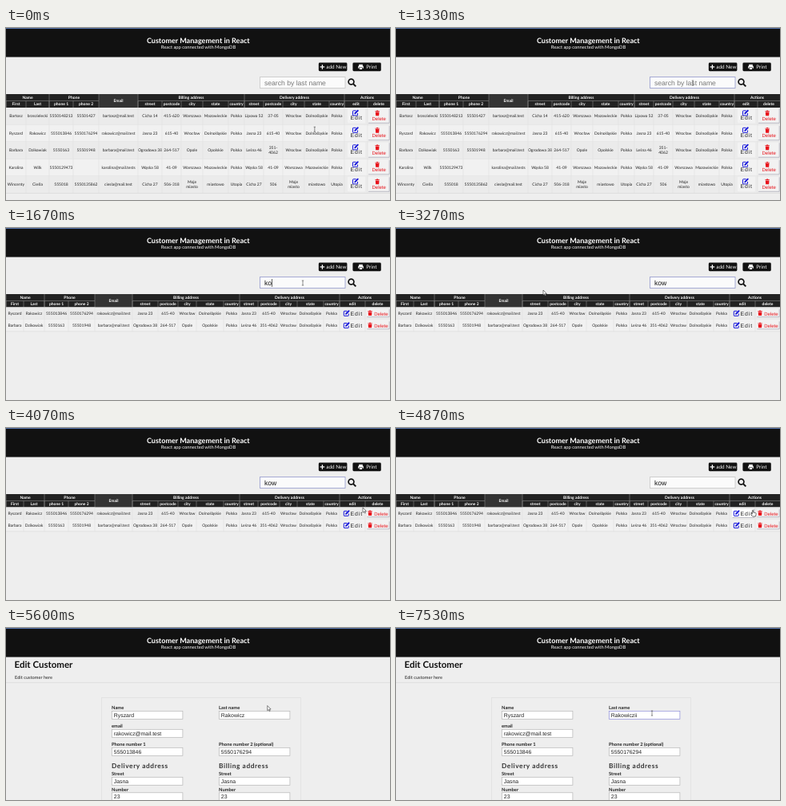
An HTML page for the animation above (8 s loop, 480 px wide and 216 px high).

```html
<!DOCTYPE html>
<html lang="en">
<head>
<meta charset="utf-8">
<title>Customer Management</title>
<style>
  html, body { margin: 0; width: 100%; height: 100%; overflow: hidden; background: #eee; }
  svg { display: block; width: 480px; height: 216px; }
  text { font-family: Lato, "Open Sans", sans-serif; text-rendering: geometricPrecision; white-space: pre; }
  .b { font-weight: 700; }
  .field { font-family: "Liberation Sans", Arial, sans-serif; }
</style>
</head>
<body>
<svg viewBox="0 0 480 216">
  <defs>
    <g id="pen">
      <path d="M4.6 1.4H1.2Q.5 1.4 .5 2.1V6.9Q.5 7.5 1.2 7.5H5.9Q6.5 7.5 6.5 6.9V4.6" fill="none" stroke="#1818dc"/>
      <path d="M2.3 5.8L2.6 4.1L6.1 .5Q6.8 0 7.4 .6Q8 1.2 7.5 1.9L4 5.5Z" fill="#1818dc"/>
    </g>
    <path id="bin" fill="#e8141c" d="M0 .8H1.6L2 .1H3.5L3.9 .8H5.5V1.5H0ZM.4 2H5.1L4.8 6.2Q4.7 6.7 4.2 6.7H1.3Q.8 6.7 .7 6.2Z"/>
    <path id="arrow" d="M0 0V6.2L1.5 4.9L2.5 7L3.4 6.6L2.5 4.5H4.4Z" fill="#fff" stroke="#333" stroke-width=".6"/>
    <path id="beam" d="M-1.2 -3H1.2M0 -3V3M-1.2 3H1.2" fill="none" stroke="#444" stroke-width=".6"/>
    <path id="hand" d="M-.6 .3Q0 -.4 .6 .3V3L3.5 3.6Q4.3 3.9 4.1 4.8L3.5 8H-.5L-2.4 5.2Q-2.3 4.3 -1.4 4.6L-.6 5.2Z" fill="#fff" stroke="#222" stroke-width=".6"/>
  </defs>
  <rect width="480" height="216" fill="#eee"/>
  <g id="view"></g>
  <rect width="480" height="36.5" fill="#111"/>
  <rect width="480" height="1" fill="#5574ae"/>
  <g fill="#fff" text-anchor="middle">
    <text class="b" x="240.3" y="19" font-size="9.05">Customer Management in React</text>
    <text x="240.5" y="26.3" font-size="5.8">React app connected with MongoDB</text>
  </g>
  <use id="cursor"/>
</svg>
<script>
const LOOP = 8000, FPS = 15;
const view = document.getElementById('view');
const cursor = document.getElementById('cursor');
const ruler = document.createElement('canvas').getContext('2d');

const customers = [
  'Bartosz|brzezielecki|5550148213|55501427|bartosz@mail.test|Cicha 14|415-620|Warszawa|Mazowieckie|Polska|Lipowa 52|37-05|Wrocław|Dolnośląskie|Polska',
  'Ryszard|Rakowicz|555013846|5550176294|rakowicz@mail.test|Jasna 23|615-40|Wrocław|Dolnośląskie|Polska|Jasna 23|615-40|Wrocław|Dolnośląskie|Polska',
  'Barbara|Dzikowiak|5550163|55501948|barbara@mail.test|Ogrodowa 38|264-517|Opole|Opolskie|Polska|Leśna 46|351-~4062|Wrocław|Dolnośląskie|Polska',
  'Karolina|Wilk|5550129473||karolina@mail.tests|Wąska 58|41-09|Warszawa|Mazowieckie|Polska|Wąska 58|41-09|Warszawa|Mazowieckie|Polska',
  'Wincenty|Cieśla|555018|5550135862|ciesla@mail.test|Cicha 27|506-318|Moje~miasto|miastowo|Utopia|Cicha 27|506|Moje~miasto|miastowo|Utopia'
].map(row => row.split('|'));

const address = ['street', 'postcode', 'city', 'state', 'country'];
const columns = ['First', 'Last', 'phone 1', 'phone 2', '', ...address, ...address, 'edit', 'delete'];
const groups = [['Name', 0, 2], ['Phone', 2, 4], ['Billing address', 5, 10], ['Delivery address', 10, 15], ['Actions', 15, 17]];
const tall = { top: 100, row: 21.5, x: [0, 25, 54, 84, 116, 165, 195, 219, 246, 278, 298, 322, 346, 373, 404, 423, 452, 480] };
const flat = { top: 99.5, row: 15.2, x: [0, 22, 48, 78, 111, 158, 190, 215, 238, 272, 292, 315, 342, 364, 397, 417, 449, 480] };

// Step tables: [time, value] holds until the next entry.
const query = [[0, ''], [1470, 'k'], [1600, 'ko'], [2330, 'kow']];
const surname = [[0, 'Rakowicz'], [6870, 'Rakowiczi'], [7000, 'Rakowiczii']];
const focus = [[0, ''], [730, 'search'], [4670, ''], [6070, 'last']];
const page = [[0, 'list'], [4930, 'empty'], [5130, 'form']];
const hover = [[0, 0], [4330, 1], [4470, 0], [4730, 1]];
const caret = [[0, 0], [730, 1], [1330, 0], [1470, 1], [2130, 0], [2330, 1], [2930, 0], [3470, 1], [4000, 0],
  [4530, 1], [4670, 0], [6070, 1], [6600, 0], [6870, 1], [7530, 0]];
const shape = [[0, 'beam'], [200, 'arrow'], [600, 'beam'], [3130, 'arrow'], [4330, 'hand'], [5130, 'arrow'], [5870, 'beam']];
const path = [[0, 386, 128], [270, 374, 77], [400, 374, 77], [600, 371, 69], [3070, 371, 69], [3270, 184, 78],
  [3400, 184, 78], [3530, 135, 100], [3730, 311, 101], [3870, 311, 101], [4070, 446, 100], [4400, 446, 100],
  [4530, 464, 103], [4600, 464, 103], [4730, 446, 103], [5070, 446, 103], [5330, 336, 97.5], [5470, 336, 97.5],
  [5600, 327, 97.5], [5730, 319, 98], [5800, 319, 98], [5930, 320, 107]];

const at = (steps, t) => steps.reduce((value, [start, next]) => t >= start ? next : value, steps[0][1]);

function place(t) {
  const i = path.findIndex(p => p[0] > t);
  if (i < 0) return path[path.length - 1].slice(1);
  const a = path[i - 1], b = path[i], k = (t - a[0]) / (b[0] - a[0]);
  return [a[1] + (b[1] - a[1]) * k, a[2] + (b[2] - a[2]) * k];
}

const text = (x, y, s, size, attrs = '') => `<text x="${x}" y="${y}" font-size="${size}" ${attrs}>${s}</text>`;
const rect = (x, y, w, h, fill, attrs = '') => `<rect x="${x}" y="${y}" width="${w}" height="${h}" fill="${fill}" ${attrs}/>`;
const line = (x1, y1, x2, y2, stroke) => `<path d="M${x1} ${y1}L${x2} ${y2}" stroke="${stroke}" stroke-width=".6"/>`;
const icon = (id, x, y) => `<use href="#${id}" x="${x}" y="${y}"/>`;
const mid = 'text-anchor="middle"';

function caretAt(x, y, s, size) {
  ruler.font = `${size}px "Liberation Sans", Arial, sans-serif`;
  return rect(x + ruler.measureText(s).width + .2, y, .7, size * 1.15, '#222');
}

// A button with a shaded lower right edge.
const button = (x, y, w, h, fill = '#f2f2f2') => rect(x, y, w, h, fill, 'rx=".8"') +
  `<path d="M${x + .5} ${y + h}H${x + w}V${y + .5}" fill="none" stroke="#a6a6b4" stroke-width=".7"/>`;

function toolbar(s) {
  const on = s.focus === 'search', white = 'fill="#fff"';
  return rect(390.8, 43.6, 35.6, 10.6, '#111', 'rx="1.4"') + rect(433.4, 43.6, 35.4, 10.6, '#111', 'rx="1.4"') +
    '<path d="M392.6 48.9H398.2M395.4 46.1V51.7" stroke="#fff" stroke-width="1.2"/>' +
    text(400.3, 51.1, 'add New', 6.4, white) + text(450.2, 51.1, 'Print', 6.4, white) +
    '<path d="M441.2 45.8H445.8V47.8H446.8V50.8H445.8V49.6H441.2V50.8H440.2V47.8H441.2ZM441.9 50H445.1V52H441.9Z" fill="#fff"/>' +
    rect(317.4, 61.6, 106.6, 13.9, '#fbfbfb', `stroke="${on ? '#9298cc' : '#c6c6c6'}" stroke-width=".8"`) +
    text(323, 71.8, s.query || 'search by last name', 8.6, `class="field" fill="${s.query ? '#111' : '#777'}"`) +
    (on && s.caret ? caretAt(323, 64, s.query, 8.6) : '') +
    '<circle cx="431.5" cy="67.5" r="3.4" fill="none" stroke="#111" stroke-width="1.7"/>' +
    '<path d="M434 70.1L437.3 73.4" stroke="#111" stroke-width="2"/>';
}

function tableHead({ x, top }) {
  const center = (a, b) => (x[a] + x[b]) / 2;
  const head = (cx, y, s) => text(cx, y, s, 5, `class="b" fill="#fff" ${mid}`);
  let out = rect(0, 83, 480, top - 83, '#222') + rect(x[4], 83, x[5] - x[4], top - 83, '#333');
  for (const [name, a, b] of groups) {
    out += head(center(a, b), 89.2, name) + line(x[a], 91.5, x[b], 91.5, '#888') + line(x[a], 83, x[a], top, '#888');
  }
  columns.forEach((name, i) => {
    out += head(center(i, i + 1), 97.4, name) + line(x[i], i === 4 ? 83 : 91.5, x[i], top, '#888');
  });
  return out + head(center(4, 5), 93.2, 'Email');
}

function actions(layout, y, lit) {
  const [a, b, end] = layout.x.slice(15), h = layout.row;
  const spaced = 'class="field" fill="#222" letter-spacing=".9"', red = 'class="field" fill="#e8141c"';
  if (layout === tall) {
    return rect(a + 4, y + .8, 22, h - 3, '#f2f2f2', 'rx="1"') + icon('pen', a + 10, y + 2.4) +
      text(a + 7.4, y + 15.4, 'Edit', 6.9, spaced) +
      button(b + .6, y + .8, end - b - 1.4, h - 3) + icon('bin', b + 9.4, y + 3.5) +
      text(b + 14.2, y + 15.6, 'Delete', 6, red + mid);
  }
  return (lit ? button(a + 3, y + 2, 27.5, 11, '#fff') : '') + icon('pen', a + 4.8, y + 3.4) +
    text(a + 13.5, y + 10, 'Edit', 6.9, spaced) +
    button(b + 1.8, y + 2.2, end - b - 2.6, 10) + icon('bin', b + 3.3, y + 3.9) +
    text(b + 11.2, y + 10, 'Delete', 6, red);
}

function list(s) {
  const rows = customers.filter(c => c[1].toLowerCase().includes(s.query));
  const layout = rows.length > 2 ? tall : flat, { x, top, row } = layout;
  let out = toolbar(s) + tableHead(layout);
  rows.forEach((cells, r) => {
    const y = top + r * row, base = y + row / 2 + 1.4;
    out += rect(0, y, 480, row, r % 2 ? '#f1f1f1' : '#ebebeb') + line(0, y + row, 480, y + row, '#d6d6d6');
    cells.forEach((cell, i) => {
      const parts = layout === tall ? cell.split('~') : [cell.replace('~', '')];
      parts.forEach((part, n) => {
        out += text((x[i] + x[i + 1]) / 2, base + (n - (parts.length - 1) / 2) * 6, part, 5, `fill="#222" ${mid}`);
      });
    });
    out += x.slice(1, -1).map(v => line(v, y, v, y + row, '#e0e0e0')).join('');
    out += actions(layout, y, s.hover && r === 0);
  });
  return out;
}

function field(x, y, label, value, on, showCaret) {
  return text(x, y, label, 5.8, 'class="b" fill="#222"') +
    rect(x + .3, y + 2.3, 88.6, 10, '#fff', `stroke="${on ? '#8c8cda' : '#b6b6b6'}" stroke-width=".7"`) +
    text(x + 2.8, y + 9.8, value, 6.9, 'class="field" fill="#222"') +
    (on && showCaret ? caretAt(x + 2.8, y + 3.4, value, 6.9) : '');
}

function form(s) {
  const c = customers[1], [street, number] = c[5].split(' ');
  const val = v => s.page === 'form' ? v : '';
  const heading = 'class="b" fill="#333" letter-spacing=".6"';
  let out = text(10.5, 50, 'Edit Customer', 11.5, 'class="b" fill="#111"') +
    text(11, 64, 'Edit customer here', 5.7, 'fill="#222"') +
    line(0, 69, 480, 69, '#c4c4c4') + line(0, 69.7, 480, 69.7, '#f6f6f6') +
    rect(119.4, 87.4, 249, 140, 'none', 'stroke="#e0e0e0" stroke-width=".8"') +
    field(132, 102, 'Name', val(c[0])) +
    field(266, 102, 'Last name', val(s.surname), s.focus === 'last', s.caret) +
    field(132, 125, 'email', val(c[4])) +
    field(132, 148, 'Phone number 1', val(c[2])) +
    field(266, 148, 'Phone number 2 (optional)', val(c[3]));
  [[132, 'Delivery address'], [266, 'Billing address']].forEach(([x, title]) => {
    out += text(x, 176, title, 8.3, heading) + field(x, 185, 'Street', val(street)) + field(x, 204.5, 'Number', val(number));
  });
  return out;
}

let shown = '';
function draw(now) {
  const t = Math.floor((now % LOOP + 4) * FPS / 1000) * 1000 / FPS + 4;
  const s = {
    query: at(query, t), surname: at(surname, t), focus: at(focus, t),
    page: at(page, t), caret: at(caret, t), hover: at(hover, t)
  };
  const key = JSON.stringify(s);
  if (key !== shown) {
    view.innerHTML = s.page === 'list' ? list(s) : form(s);
    shown = key;
  }
  const [x, y] = place(t);
  cursor.setAttribute('href', '#' + at(shape, t));
  cursor.setAttribute('transform', `translate(${x} ${y})`);
}

const start = performance.now();
function tick() {
  draw(performance.now() - start);
  requestAnimationFrame(tick);
}
tick();
</script>
</body>
</html>
```
